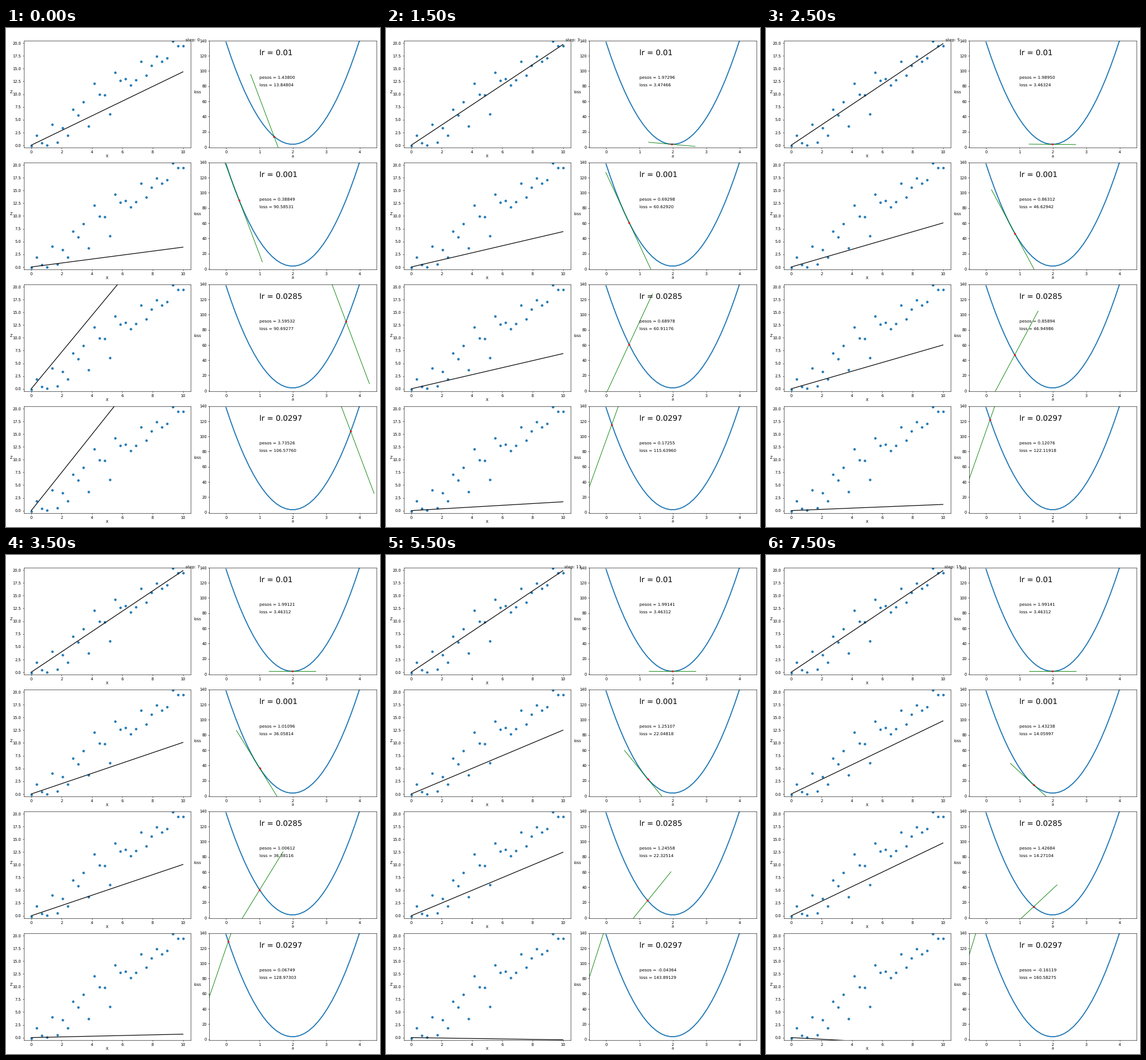
Write a matplotlib script that moves like this. It is 648x864 px and loops after 8000 ms.

```python
import numpy as np
import matplotlib.pyplot as plt
from matplotlib.animation import FuncAnimation

W, H, DPI = 648, 864, 43.2
STEPS, INTERVAL = 16, 500
RATES = [0.01, 0.001, 0.0285, 0.0297]

# Layout in pixels, measured from the top left corner
TOP, PITCH, AX_H = 21.8, 210.9, 185.5
LEFT, RIGHT, AX_W = 30.6, 352.3, 289.2

plt.rcParams.update({
    "font.family": "DejaVu Sans",
    "font.size": 11,
    "text.hinting": "none",
    "axes.linewidth": 1.0,
    "xtick.major.width": 1.0,
    "ytick.major.width": 1.0,
})

# Noisy samples around z = 2x
x = np.linspace(0, 10, 30)
z = np.array([
    -0.16, 1.93, 0.40, 0.03, 4.03, 0.57, 3.41, 1.93, 7.03, 5.90,
    8.50, 3.69, 12.07, 9.91, 9.80, 6.12, 14.22, 12.69, 12.97, 11.78,
    12.80, 16.42, 13.71, 15.58, 17.44, 16.42, 17.05, 20.33, 19.42, 19.42,
])

# The squared error is a parabola in the slope a
CURVATURE = np.mean(x ** 2)
BEST, FLOOR = 1.991411, 3.46312
START = BEST - 1.71953658


def loss(a):
    return FLOOR + CURVATURE * (a - BEST) ** 2


def grad(a):
    return 2 * CURVATURE * (a - BEST)


def weight(rate, updates):
    """Slope after a number of gradient descent updates."""
    return BEST + (START - BEST) * (1 - 2 * rate * CURVATURE) ** updates


def add_axes(left, row, xlim, ylim, xlabel, ylabel, pad):
    bottom = H - (TOP + row * PITCH + AX_H)
    ax = fig.add_axes([left / W, bottom / H, AX_W / W, AX_H / H])
    ax.set(xlim=xlim, ylim=ylim)
    ax.set_xlabel(xlabel, labelpad=1.4)
    ax.set_ylabel(ylabel, rotation=0, labelpad=pad)
    return ax


class Row:
    """Data fit on the left, loss curve with its tangent on the right."""

    def __init__(self, index, rate):
        self.rate = rate

        fit = add_axes(LEFT, index, (-0.5, 10.5), (-0.5, 20.5), "X", "Z", 5)
        fit.set_xticks(range(0, 11, 2))
        fit.set_yticks(np.arange(0, 20.1, 2.5))
        fit.plot(x, z, "o", color="tab:blue", ms=6)
        self.line, = fit.plot([], [], "k", lw=2)

        ax = add_axes(RIGHT, index, (-0.5, 4.5), (-1, 140), "a", "loss", 6)
        ax.set_xticks(range(5))
        ax.set_yticks(range(0, 141, 20))
        grid = np.linspace(0, 4, 30)
        ax.plot(grid, loss(grid), color="tab:blue", lw=3)
        self.tangent, = ax.plot([], [], "g", lw=1.5)
        self.point, = ax.plot([], [], "r*", ms=6)
        ax.text(1, 120, f"lr = {rate}", fontsize=22)
        self.weight_text = ax.text(1, 90, "", fontsize=12)
        self.loss_text = ax.text(1, 80, "", fontsize=12)

    def show(self, step):
        a = weight(self.rate, step + 1)
        # The tangent keeps the gradient that led to this point
        slope = grad(weight(self.rate, step))
        reach = np.array([-0.7, 0.7])
        self.line.set_data(x, a * x)
        self.tangent.set_data(a + reach, loss(a) + slope * reach)
        self.point.set_data([a], [loss(a)])
        self.weight_text.set_text(f"pesos = {a:.5f}")
        self.loss_text.set_text(f"loss = {loss(a):.5f}")


fig = plt.figure(figsize=(W / DPI, H / DPI), dpi=DPI, facecolor="white")
title = fig.suptitle("", fontsize=12, y=0.98)
rows = [Row(i, rate) for i, rate in enumerate(RATES)]


def update(step):
    title.set_text(f"step: {step}")
    for row in rows:
        row.show(step)


anim = FuncAnimation(fig, update, frames=STEPS, interval=INTERVAL,
                     repeat=True, repeat_delay=0, blit=False)
plt.show()
```
